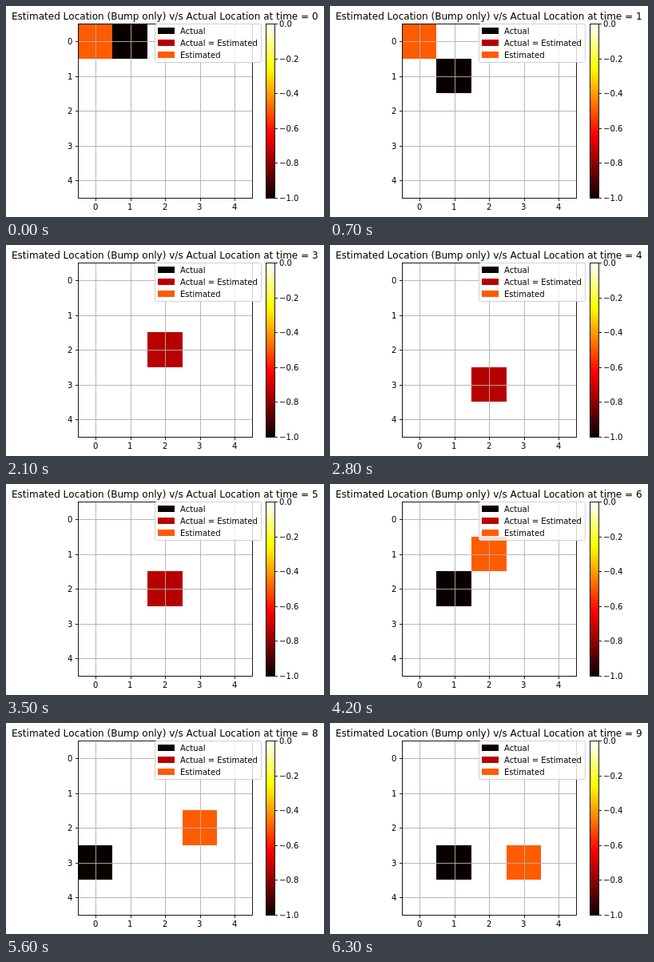
Write an HTML page with a canvas that moves like this. It is 398 by 264 pixels and loops after 7 s.

```html
<!DOCTYPE html>
<html lang="en">
<head>
<meta charset="utf-8">
<title>Estimated and actual location</title>
<style>
html, body { margin: 0; width: 100%; height: 100%; overflow: hidden; background: #fff; }
canvas { display: block; }
</style>
</head>
<body>
<canvas id="plot" width="398" height="264"></canvas>
<script>
const ctx = document.getElementById('plot').getContext('2d');
const STEP = 700;
const LEFT = 90, TOP = 22, SIZE = 218, CELL = SIZE / 5;
const ACTUAL = '#0b0000', BOTH = '#b70000', ESTIMATED = '#ff5c00';

// One entry per time step: [column, row] of each location.
const actual = [[1,0], [1,1], [2,1], [2,2], [2,3], [2,2], [1,2], [1,3], [0,3], [1,3]];
const estimated = [[0,0], [0,0], [2,1], [2,2], [2,3], [2,2], [2,1], [2,2], [3,2], [3,3]];

function rect(x, y, w, h, color) {
  ctx.fillStyle = color;
  ctx.fillRect(x, y, w, h);
}

// Text starts on a whole pixel; anchor is 0 (left), 0.5 (centre) or 1 (right).
function text(str, x, y, anchor = 0, size = 10) {
  ctx.font = `${size}px "DejaVu Sans", sans-serif`;
  ctx.fontKerning = 'none';
  ctx.fillStyle = '#000';
  ctx.fillText(str, Math.round(x - ctx.measureText(str).width * anchor), y);
}

function frame(x, y, w, h) {
  ctx.strokeStyle = '#000';
  ctx.lineWidth = 0.9;
  ctx.strokeRect(x + 0.5, y + 0.5, w, h);
}

const columnEdge = col => Math.round(LEFT - 0.2 + col * CELL);
const rowEdge = row => Math.round(TOP + row * CELL);

function cell([col, row], color) {
  const x = columnEdge(col), y = rowEdge(row);
  rect(x, y, columnEdge(col + 1) - x, rowEdge(row + 1) - y, color);
}

function drawAxes() {
  for (let i = 0; i < 5; i++) {
    const center = (i + 0.5) * CELL;
    const offset = Math.round(center + 0.2);
    const x = LEFT + offset, y = TOP + offset;
    rect(x, TOP, 1, SIZE, 'rgba(176,176,176,.9)');
    rect(LEFT, y, SIZE, 1, 'rgba(176,176,176,.9)');
    rect(x, TOP + SIZE, 1, 4, '#222');
    rect(LEFT - 3, y, 3, 1, '#222');
    text(i, LEFT + center, 255, 0.5);
    text(i, 83.4, y + 4, 1);
  }
  frame(LEFT, TOP, SIZE, SIZE);
}

function drawColorbar() {
  const heat = ctx.createLinearGradient(0, TOP + SIZE, 0, TOP);
  heat.addColorStop(0, ACTUAL);
  heat.addColorStop(0.365, '#f00');
  heat.addColorStop(0.746, '#ff0');
  heat.addColorStop(1, '#fff');
  rect(325, TOP, 11, SIZE, heat);
  frame(325, TOP, 11, SIZE);
  for (let i = 0; i <= 5; i++) {
    const y = Math.round(TOP + i * CELL);
    rect(337, y, 3, 1, '#222');
    text((i ? '\u2212' : '') + (i / 5).toFixed(1), 342, y + 4);
  }
}

function drawLegend() {
  ctx.beginPath();
  ctx.roundRect(186.5, 22.5, 133, 48, 2);
  ctx.fillStyle = 'rgba(255,255,255,.8)';
  ctx.fill();
  ctx.strokeStyle = '#d0d0d0';
  ctx.lineWidth = 1;
  ctx.stroke();
  [['Actual', ACTUAL], ['Actual = Estimated', BOTH], ['Estimated', ESTIMATED]].forEach(([label, color], i) => {
    const y = 27 + i * 15;
    rect(190, y, 21, 8, color);
    text(label, 218, y + 8);
  });
}

function draw(now) {
  const step = Math.floor(now / STEP) % actual.length;
  const a = actual[step], e = estimated[step];
  rect(0, 0, 398, 264, '#fff');
  if (String(a) === String(e)) {
    cell(a, BOTH);
  } else {
    cell(a, ACTUAL);
    cell(e, ESTIMATED);
  }
  drawAxes();
  drawColorbar();
  drawLegend();
  text(`Estimated Location (Bump only) v/s Actual Location at time = ${step}`, 199, 17, 0.5, 12.04);
  requestAnimationFrame(draw);
}

requestAnimationFrame(draw);
</script>
</body>
</html>
```
